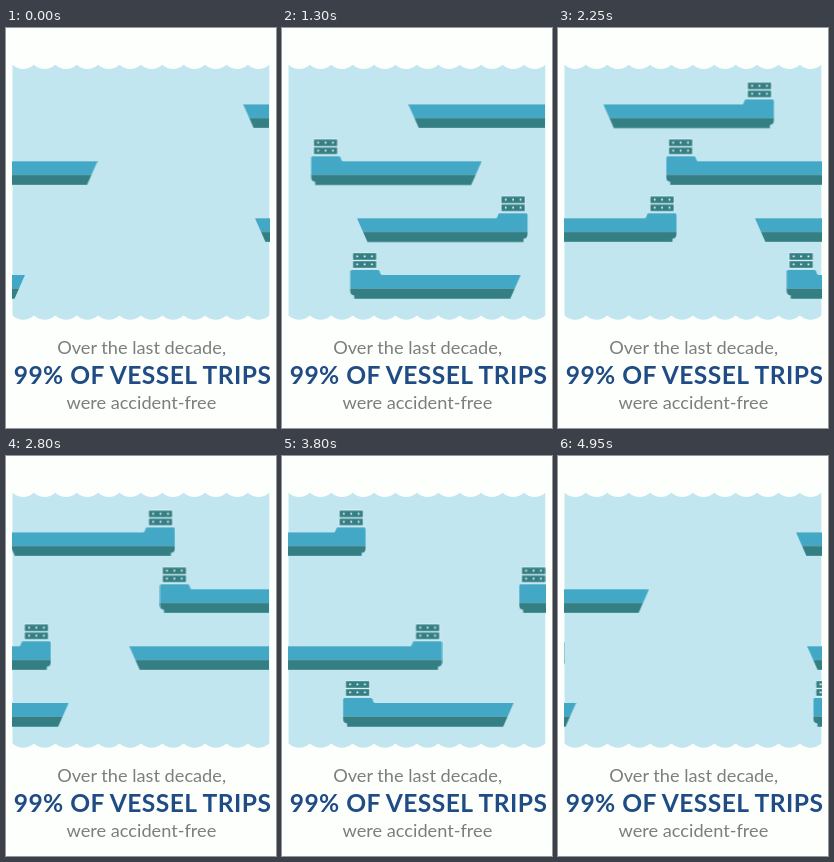
An HTML page for the animation above (5 s loop, 270 px wide and 400 px high).

```html
<!DOCTYPE html>
<html lang="en">
<head>
<meta charset="utf-8">
<title>Vessel trips</title>
<style>
  html, body { margin: 0; width: 100%; height: 100%; overflow: hidden; background: #fdfffc; }
  svg { display: block; width: 270px; height: 400px; }
  text { font-family: Lato, "Open Sans", sans-serif; font-size: 18.2px; fill: #7c7d7f; text-anchor: middle; }
  .strong { font-size: 24.6px; font-weight: 700; letter-spacing: .45px; fill: #204c85; }
  .water { fill: #c2e6f0; }
  .hull { fill: #43a8c5; }
  .keel, .box { fill: #347f84; }
  .box { stroke: #e2f3f5; stroke-width: 1.2; paint-order: stroke; }
  .dot { fill: #f2faf9; }
  .lane { animation: sail 5s steps(100) infinite; }
  @keyframes sail { to { transform: translateX(var(--run)); } }
</style>
</head>
<body>
<svg viewBox="0 0 270 400">
  <defs>
    <clipPath id="frame"><rect x="6.3" y="36" width="257" height="257"/></clipPath>

    <g id="tier">
      <rect class="box" x="-167.7" width="23.2" height="6.6"/>
      <path class="dot" d="M-164.4 2.4h1.7v1.7h-1.7z M-157 2.4h1.7v1.7h-1.7z M-149.6 2.4h1.7v1.7h-1.7z"/>
    </g>

    <!-- Bow tip at the origin, facing right -->
    <g id="ship">
      <use href="#tier" y="-21.8"/>
      <use href="#tier" y="-13.8"/>
      <path class="hull" d="M0 0L-6 13.6H-170.5V-3.5Q-170.5 -5 -169 -5H-143Q-141 -5 -140.6 -2Q-140.4 0 -138.5 0Z"/>
      <path class="keel" d="M-6 13.6L-10.5 23.7H-166.5V20.5Q-170.5 20 -170.5 16V13.6Z"/>
    </g>
    <use id="back" href="#ship" transform="scale(-1 1)"/>
  </defs>

  <path id="sea" class="water"/>

  <g clip-path="url(#frame)">
    <g transform="translate(237.3 76.4)">
      <g class="lane" style="--run:-426.5px">
        <use href="#back"/><use href="#back" x="423"/>
      </g>
    </g>
    <g transform="translate(91.5 133.3)">
      <g class="lane" style="--run:416px">
        <use href="#ship"/><use href="#ship" x="-412.3"/>
      </g>
    </g>
    <g transform="translate(249 190.3)">
      <g class="lane" style="--run:-669px">
        <use href="#back"/><use href="#back" x="249"/><use href="#back" x="662.5"/>
      </g>
    </g>
    <g transform="translate(19 247)">
      <g class="lane" style="--run:845px">
        <use href="#ship"/><use href="#ship" x="-429.6"/><use href="#ship" x="-837.5"/>
      </g>
    </g>
  </g>

  <text x="135.6" y="325.6">Over the last decade,</text>
  <text class="strong" x="136.5" y="355.5">99% OF VESSEL TRIPS</text>
  <text x="135.4" y="381.2">were accident-free</text>
</svg>
<script>
  // Scalloped edges: the same wave along the top and the bottom
  const count = 12, left = 6.5, right = 263.3, step = (right - left) / count;
  const wave = dx => `q${dx / 2} 8.6 ${dx} 0`.repeat(count);
  document.getElementById('sea').setAttribute('d',
    `M${left} 36.8${wave(step)}V287.5${wave(-step)}Z`);
</script>
</body>
</html>
```
